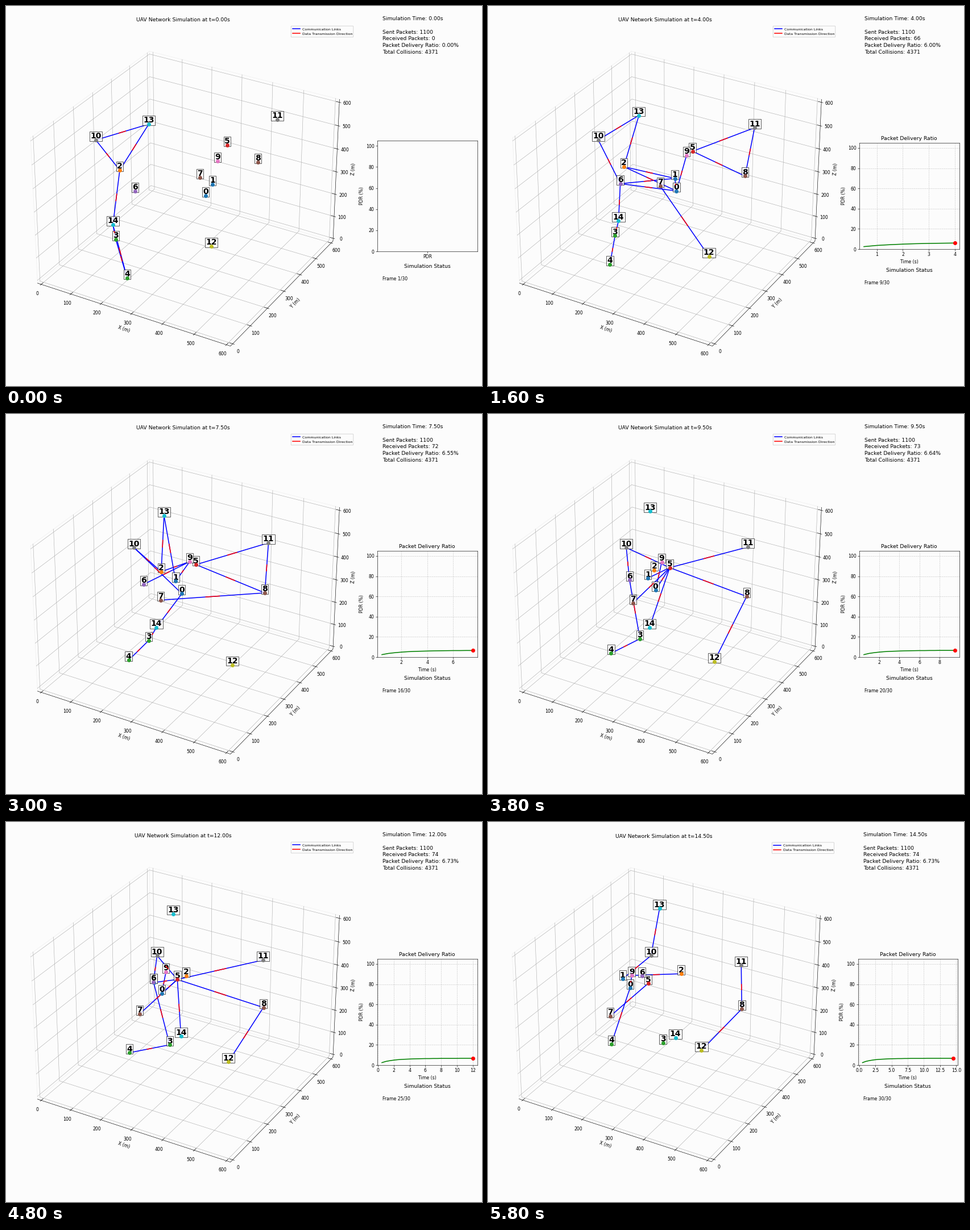
A matplotlib script for the animation above (6000 ms loop, 837 px wide and 669 px high).

```python
import numpy as np
import matplotlib.pyplot as plt
from matplotlib.animation import FuncAnimation
from matplotlib.patches import FancyBboxPatch

W, H, DPI = 837, 669, 55.8
FRAMES, STEP = 30, 0.5
BG = "#fcfcfc"
SENT, COLLISIONS = 1100, 4371

plt.rcParams["font.family"] = "DejaVu Sans"
fig = plt.figure(figsize=((W + 0.01) / DPI, (H + 0.01) / DPI), dpi=DPI, facecolor=BG)
scene = fig.add_axes([0, 0, 1, 1], facecolor="none")
panel = fig.add_axes([0, 0, 1, 1], facecolor="none")
pdr_ax = fig.add_axes([0.78, 0.36, 0.2, 0.28], facecolor=BG)

# --- drones -----------------------------------------------------------------
COLORS = plt.cm.tab10(np.linspace(0, 1, 15))
flights = []


def fly(*points):
    """Smooth flight through evenly timed points: two make a line, three a bow."""
    times = np.linspace(0, FRAMES - 1, len(points))
    flights.append(np.polyfit(times, np.array(points, float), len(points) - 1))


fly((351, 334), (311, 317), (251, 292))
fly((363, 314), (238, 276))
fly((200, 289), (341, 267))
fly((193, 411), (249, 399), (309, 389))
fly((213, 479), (218, 391))
fly((389, 245), (283, 284))
fly((227, 326), (241, 301), (272, 271))
fly((341, 302), (274, 327), (216, 342))
fly((443, 275), (455, 314), (448, 329))
fly((372, 273), (325, 260), (254, 270))
fly((158, 236), (288, 235))
fly((477, 200), (447, 252))
fly((361, 423), (398, 442), (377, 402))
fly((251, 208), (303, 152))
fly((188, 385), (262, 376), (331, 380))

# relay chains around some key steps
ROUTES = {
    0: "13-10-2-13 2-14-3-4-14",
    4: "5-11-8-5 6-10-2-1-9-0 7-12 2-14-3-4-14",
    8: "5-11-8-5 13-10-6-1-2-0-6-14-3-4 2-13 1-0-9 7-12",
    15: "5-11-8-5 8-7 10-2-13-1-9-2 10-0-14-3-4 6-9",
    22: "11-5-8-12 6-10-5-14 7-5-0-9 5-1 6-3-4",
    26: "5-11 8-12 10-13-2 3-0-4-14-0 3-6-14-9",
    29: "11-8-12 13-10-1 2-9-0-4 5-7",
}


def links(step):
    key = min(ROUTES, key=lambda k: abs(k - step))
    for route in ROUTES[key].split():
        stops = [int(n) for n in route.split("-")]
        yield from zip(stops, stops[1:])


# --- perspective box --------------------------------------------------------
ELEV, AZIM = np.radians(30), np.radians(-60)
VIEW = np.array([np.cos(ELEV) * np.cos(AZIM), np.cos(ELEV) * np.sin(AZIM), np.sin(ELEV)])
RIGHT = np.array([-np.sin(AZIM), np.cos(AZIM), 0])
UP = np.cross(VIEW, RIGHT)
SIZE = np.array([8, 8, 6]) / 7
LO, HI = -12.5, 612.5


def project(x, y, z):
    p = (np.array([x, y, z]) / 600 - 0.5) * SIZE
    k = 3265 / (10 - VIEW @ p)
    return np.array([320 + k * (RIGHT @ p), 326.7 - k * (UP @ p)])


def line3d(*points, **style):
    x, y = np.array([project(*p) for p in points]).T
    scene.plot(x, y, **style)


def write(ax, x, y, s, pt=10, **kw):
    """Text whose capitals are centred on y."""
    return ax.text(x, y + 0.365 * pt * DPI / 72, s, fontsize=pt, va="baseline", **kw)


def draw_box():
    edge = dict(color="#ededed", lw=0.8, zorder=0)
    grid = dict(color="#b0b0b0", lw=0.8, zorder=1)
    axis = dict(color="black", lw=0.8, zorder=1.5)
    line3d((LO, LO, LO), (LO, LO, HI), (LO, HI, HI), (HI, HI, HI), **edge)
    line3d((LO, LO, LO), (LO, HI, LO), (HI, HI, LO), **edge)
    line3d((LO, HI, LO), (LO, HI, HI), **edge)
    line3d((LO, LO, LO), (HI, LO, LO), (HI, HI, LO), (HI, HI, HI), **axis)
    for v in range(0, 601, 100):
        line3d((v, LO, LO), (v, HI, LO), (v, HI, HI), **grid)
        line3d((HI, v, LO), (LO, v, LO), (LO, v, HI), **grid)
        line3d((LO, LO, v), (LO, HI, v), (HI, HI, v), **grid)
        line3d((v, LO - 5, LO), (v, LO + 10, LO), **axis)
        line3d((HI + 5, v, LO), (HI - 10, v, LO), **axis)
        line3d((HI + 5, HI, v), (HI - 10, HI, v), **axis)
        for point, offset in (((v, LO, LO), (-6.8, 16)), ((HI, v, LO), (9, 13)),
                              ((HI, HI, v), (14, 1.5))):
            x, y = project(*point) + offset
            write(scene, x, y, str(v), ha="center")
    for x, y, name, turn in ((207, 568.5, "X", -18), (509, 523, "Y", 45.5), (611, 287, "Z", 87.5)):
        scene.text(x, y, f"{name} (m)", fontsize=10, rotation=turn, ha="center", va="center")


def draw_legend():
    scene.add_patch(FancyBboxPatch((502, 36), 108, 18, boxstyle="round,pad=0.8,rounding_size=1.2",
                                   fc=BG, ec="#cccccc", lw=1, zorder=5))
    for y, color, name in ((40.3, "blue", "Communication Links"),
                           (48.3, "red", "Data Transmission Direction")):
        scene.plot([504, 516.5], [y, y], color=color, lw=2, zorder=6)
        write(scene, 521, y, name, 8, zorder=6)


def draw_network(step):
    spots = [np.array([np.polyval(axis, step) for axis in f.T]) for f in flights]
    for i, j in links(step):
        a, b = spots[i], spots[j]
        scene.plot(*zip(a, b), color="blue", lw=2, zorder=2)
        scene.plot(*zip(a + 0.43 * (b - a), a + 0.57 * (b - a)), color="red", lw=2,
                   zorder=3.5, solid_capstyle="butt")
    for i, (x, y) in enumerate(spots):
        scene.text(x, y - 2.6, str(i), fontsize=18, weight="bold", ha="center", va="baseline",
                   zorder=3, bbox=dict(boxstyle="square,pad=0.1", fc=BG, ec="black", alpha=0.8))
        scene.plot(x, y, "o", color=COLORS[i], ms=8, zorder=4)


# --- right column -----------------------------------------------------------
def received(step):
    """Deliveries level off just above 74."""
    return np.rint(74.2 * (1 - np.exp(-(step / 2.822) ** 0.77)))


def place_ratio(step, squeeze):
    top, bottom = (241, 428) if step else (237, 432)
    left, right = 653 - 0.8 * squeeze, 828.6 - squeeze
    pdr_ax.set_position([left / W, 1 - bottom / H, (right - left) / W, (bottom - top) / H])


def tick_overflow():
    """How far the tick labels stick out past the right edge of the chart."""
    lo, hi = pdr_ax.get_xlim()
    ends = [t.get_window_extent().x1 for t in pdr_ax.get_xticklabels()
            if lo <= t.get_position()[0] <= hi]
    return max(0, max(ends) - pdr_ax.bbox.x1)


def draw_ratio(step):
    """Draw the chart and return how far the layout is squeezed to the left."""
    pdr_ax.clear()
    place_ratio(step, 0)
    if step:
        n = np.arange(1, step + 1)
        ratio = 100 * received(n) / SENT
        pdr_ax.plot(n * STEP, ratio, color="green", lw=2)
        pdr_ax.plot(n[-1] * STEP, ratio[-1], "ro", ms=8)
        pdr_ax.grid(True, linestyle="--", alpha=0.7)
        pdr_ax.set_title("Packet Delivery Ratio")
        pdr_ax.set_xlabel("Time (s)")
    else:
        pdr_ax.set_xlim(-0.5, 0.5)
        pdr_ax.set_xticks([0], ["PDR"])
    pdr_ax.set_ylim(0, 105)
    pdr_ax.set_ylabel("PDR (%)")
    squeeze = 0.48 * tick_overflow()
    place_ratio(step, squeeze)
    return squeeze


def draw_status(step, squeeze):
    got = int(received(step))
    lines = [f"Simulation Time: {step * STEP:.2f}s", "", f"Sent Packets: {SENT}",
             f"Received Packets: {got}", f"Packet Delivery Ratio: {100 * got / SENT:.2f}%",
             f"Total Collisions: {COLLISIONS}"]
    x = 662 - 0.75 * squeeze
    for k, s in enumerate(lines):
        write(panel, x, 21.9 + 11.7 * k, s, 12)
    y = 465 if step else 458
    write(panel, 740.6 - 0.8 * squeeze, y, "Simulation Status", 12, ha="center")
    write(panel, x, y + 21.8, f"Frame {step + 1}/{FRAMES}")


def reset(ax):
    ax.clear()
    ax.set_axis_off()


def update(step):
    reset(scene)
    reset(panel)
    draw_box()
    draw_legend()
    draw_network(step)
    write(scene, 311, 24, f"UAV Network Simulation at t={step * STEP:.2f}s", 12, ha="center")
    squeeze = draw_ratio(step)
    draw_status(step, squeeze)

    scale = 1 - 0.0025 * squeeze / 3
    shift = 0.2 * squeeze
    scene.set_xlim(shift / scale, (W + shift) / scale)
    scene.set_ylim(328 + (H - 328) / scale, 328 - 328 / scale)
    panel.set_xlim(0, W)
    panel.set_ylim(H, 0)
    return []


anim = FuncAnimation(fig, update, frames=FRAMES, interval=200, init_func=lambda: [], repeat=True)
plt.show()
```
